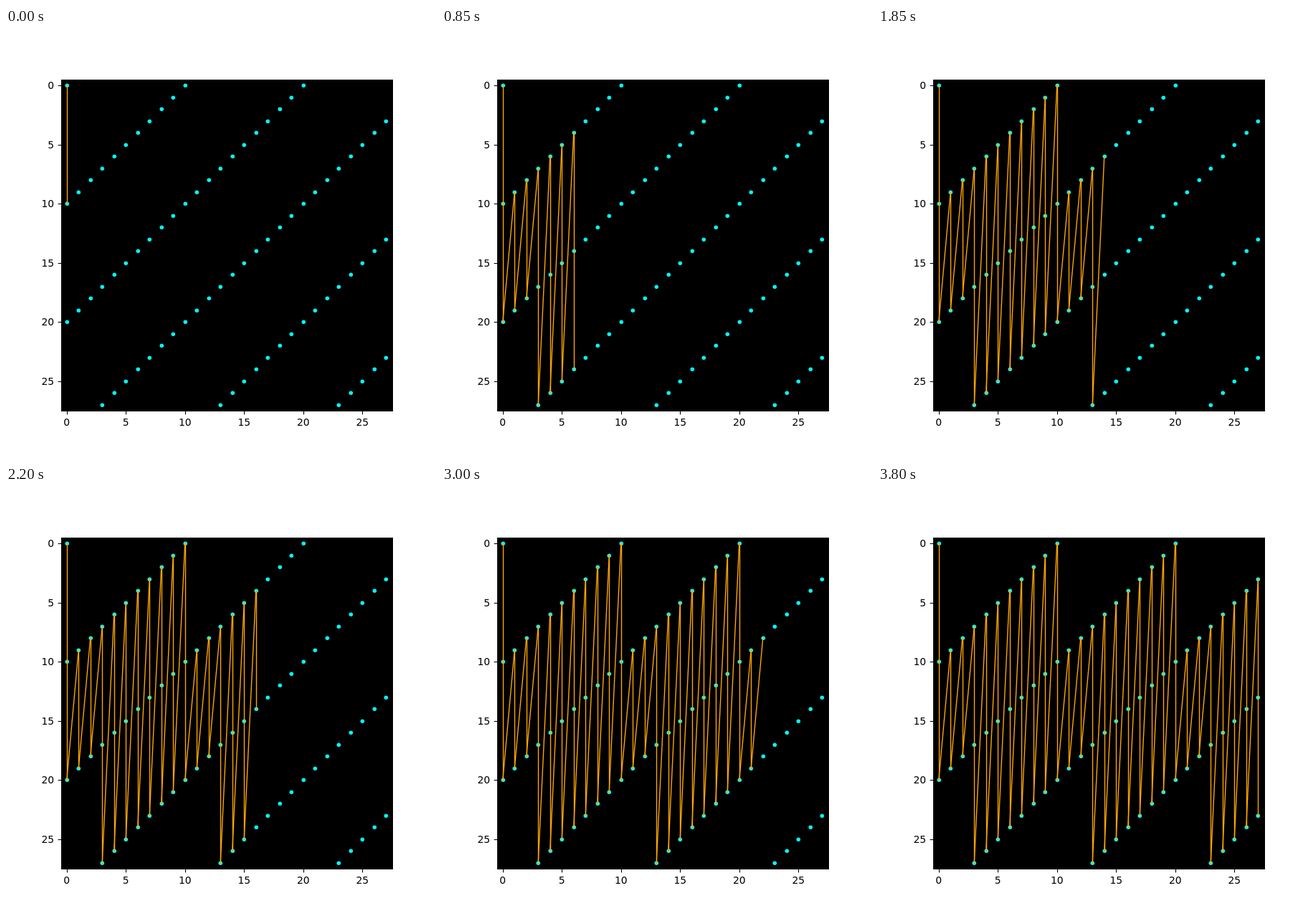
Animation, 600 px wide and 600 px high, one loop 3850 ms. Source, as an HTML page with a canvas:

```html
<!DOCTYPE html>
<html lang="en">
<head>
<meta charset="utf-8">
<title>Lattice path</title>
<style>
  html, body { margin: 0; width: 100%; height: 100%; overflow: hidden; background: #fff; }
  canvas { display: block; }
</style>
</head>
<body>
<canvas id="plot" width="600" height="600"></canvas>
<script>
const ctx = document.getElementById('plot').getContext('2d');
const SIZE = 28, CELL = 16.5, STEP_MS = 50;
const px = x => 84.75 + x * CELL;
const py = y => 80.25 + y * CELL;
const snap = v => Math.floor(v + 0.5) + 0.5;

// Lattice points on every tenth antidiagonal, column by column
const points = [];
for (let x = 0; x < SIZE; x++)
  for (let y = 0; y < SIZE; y++)
    if ((x + y) % 10 === 0) points.push([x, y]);
const steps = points.length - 1;

function line(x1, y1, x2, y2) {
  ctx.beginPath();
  ctx.moveTo(x1, y1);
  ctx.lineTo(x2, y2);
  ctx.stroke();
}

function drawAxes() {
  ctx.fillStyle = '#fff';
  ctx.fillRect(0, 0, 600, 600);
  ctx.fillStyle = ctx.strokeStyle = '#000';
  ctx.fillRect(77, 72, 463, 463);
  ctx.lineWidth = 1.11;
  ctx.lineCap = 'butt';
  ctx.font = '13.89px "DejaVu Sans", sans-serif';
  for (let v = 0; v < SIZE; v += 5) {
    const x = snap(px(v)), y = snap(py(v));
    line(x, 534.5, x, 539.4);
    line(77.5, y, 72.6, y);
    ctx.textAlign = 'center';
    ctx.fillText(v, px(v), 554.6);
    ctx.textAlign = 'right';
    ctx.fillText(v, 67.2, py(v) + 5.2);
  }
}

function drawDots() {
  ctx.fillStyle = '#0ff';
  for (const [x, y] of points) {
    ctx.beginPath();
    ctx.arc(Math.round(px(x)) + 0.3, Math.round(py(y)) + 0.3, 2.78, 0, 2 * Math.PI);
    ctx.fill();
  }
}

function drawPath(count) {
  ctx.strokeStyle = '#ffa500';
  ctx.lineWidth = 1.39;
  ctx.lineCap = 'square';
  for (let i = 0; i < count; i++) {
    const [x1, y1] = points[i], [x2, y2] = points[i + 1];
    // Vertical strokes sit on the pixel grid, slanted ones do not
    const fit = x1 === x2 ? snap : v => v;
    line(fit(px(x1)), fit(py(y1)), fit(px(x2)), fit(py(y2)));
  }
}

const start = performance.now();
function frame() {
  const elapsed = performance.now() - start;
  drawAxes();
  drawDots();
  drawPath(Math.floor(elapsed / STEP_MS) % steps + 1);
  requestAnimationFrame(frame);
}
frame();
</script>
</body>
</html>
```
